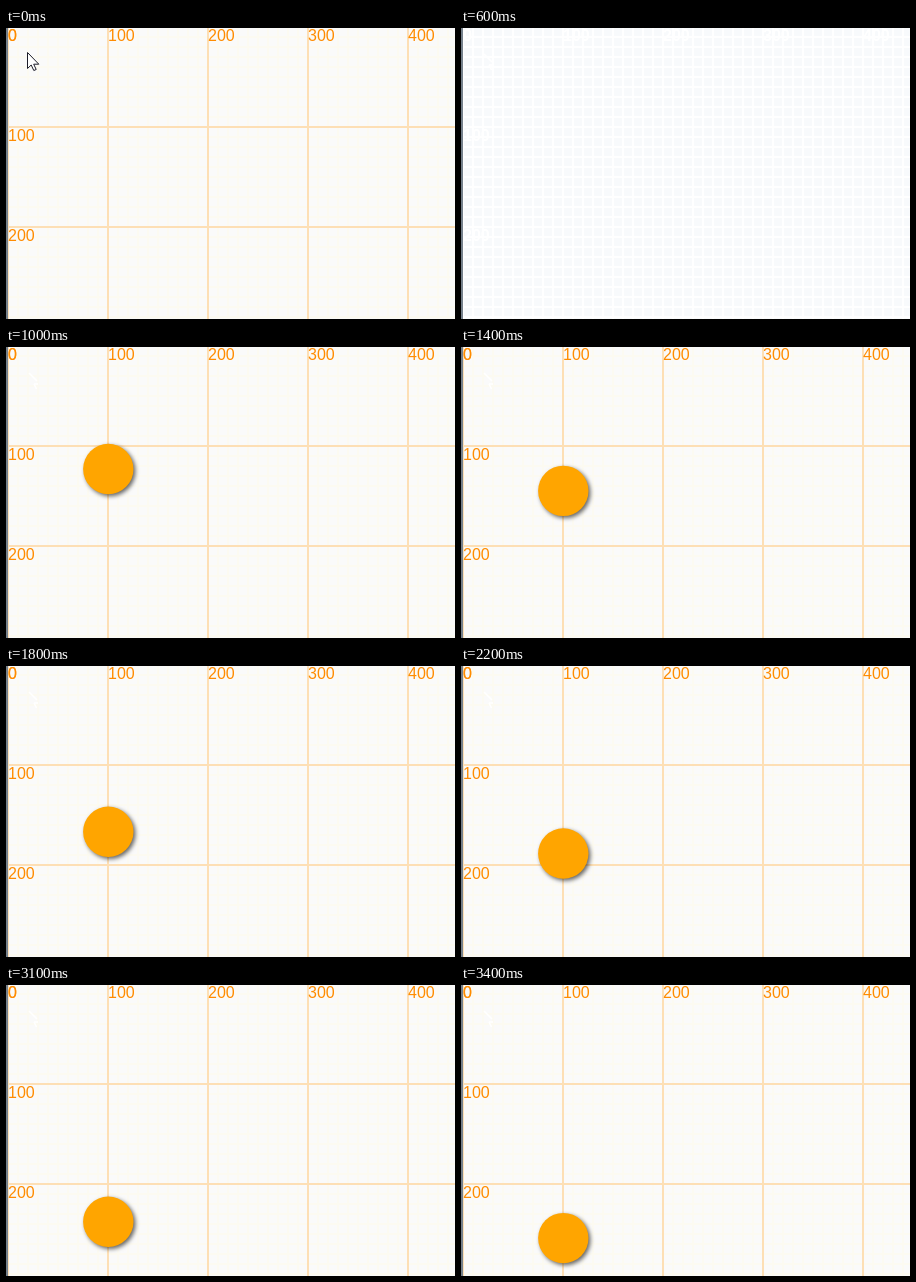
Write an HTML page with a canvas that moves like this. It is 449x291 px and loops after 3500 ms.

```html
<!DOCTYPE html>
<html>
<head>
<meta charset="utf-8">
<style>
  html, body { margin: 0; width: 100%; height: 100%; overflow: hidden; }
  canvas { display: block; }
</style>
</head>
<body>
<canvas id="stage" width="449" height="291"></canvas>
<script>
const W = 449, H = 291, LOOP = 3500, STEP = 100, START = 600;
const ctx = document.getElementById('stage').getContext('2d');
const cursor = new Path2D('M21.5 24.5V40.5L25.2 37L27.8 42.5L30.2 41.5L27.7 36.2H32.8Z');

function rect(color, x, y, w, h) {
  ctx.fillStyle = color;
  ctx.fillRect(x, y, w, h);
}

// Lines straddle two pixels around the origin (2, -1).
function grid(gap, color) {
  for (let x = 2; x < W; x += gap) rect(color, x - 1, 0, 2, H);
  for (let y = -1; y < H; y += gap) rect(color, 0, y - 1, W, 2);
}

function labels(color, weight) {
  ctx.font = weight + ' 16px "Liberation Sans", Arial, sans-serif';
  ctx.fillStyle = color;
  for (let n = 0; n <= 400; n += 100) ctx.fillText(n, 2 + n, 13);
  for (let n = 0; n <= 200; n += 100) ctx.fillText(n, 2, 13 + n);
}

function board() {
  rect('#fafafa', 0, 0, W, H);
  grid(10, '#fcfaf1');
  grid(100, '#fddfb5');
  labels('#ff8c00', 'normal');
}

function clearedBoard() {
  rect('#f8fafc', 0, 0, W, H);
  grid(10, '#fff');
  labels('#fff', 'bold');
}

function cursorGhost() {
  ctx.strokeStyle = '#fff';
  ctx.lineWidth = 1.5;
  ctx.stroke(new Path2D('M23 26L31 34M28 37H32M28 37L30.5 42'));
}

function ball(y) {
  ctx.save();
  ctx.shadowColor = 'rgba(0,0,0,.6)';
  ctx.shadowOffsetX = ctx.shadowOffsetY = 2;
  ctx.shadowBlur = 4;
  ctx.fillStyle = '#ffa500';
  ctx.beginPath();
  ctx.arc(102.3, y, 25.2, 0, Math.PI * 2);
  ctx.fill();
  ctx.restore();
}

function draw(now) {
  const t = Math.floor(now % LOOP / STEP) * STEP;
  const cleared = t === START;
  cleared ? clearedBoard() : board();
  rect('#75808b', 0, 0, 2, H);
  if (t < STEP) {
    ctx.fillStyle = '#fff';
    ctx.fill(cursor);
    ctx.strokeStyle = '#1c1c28';
    ctx.lineWidth = 1;
    ctx.stroke(cursor);
  }
  if (t >= START) cursorGhost();
  if (t > START) ball(100.2 + 0.0546 * (t - START));
  requestAnimationFrame(draw);
}
requestAnimationFrame(draw);
</script>
</body>
</html>
```
